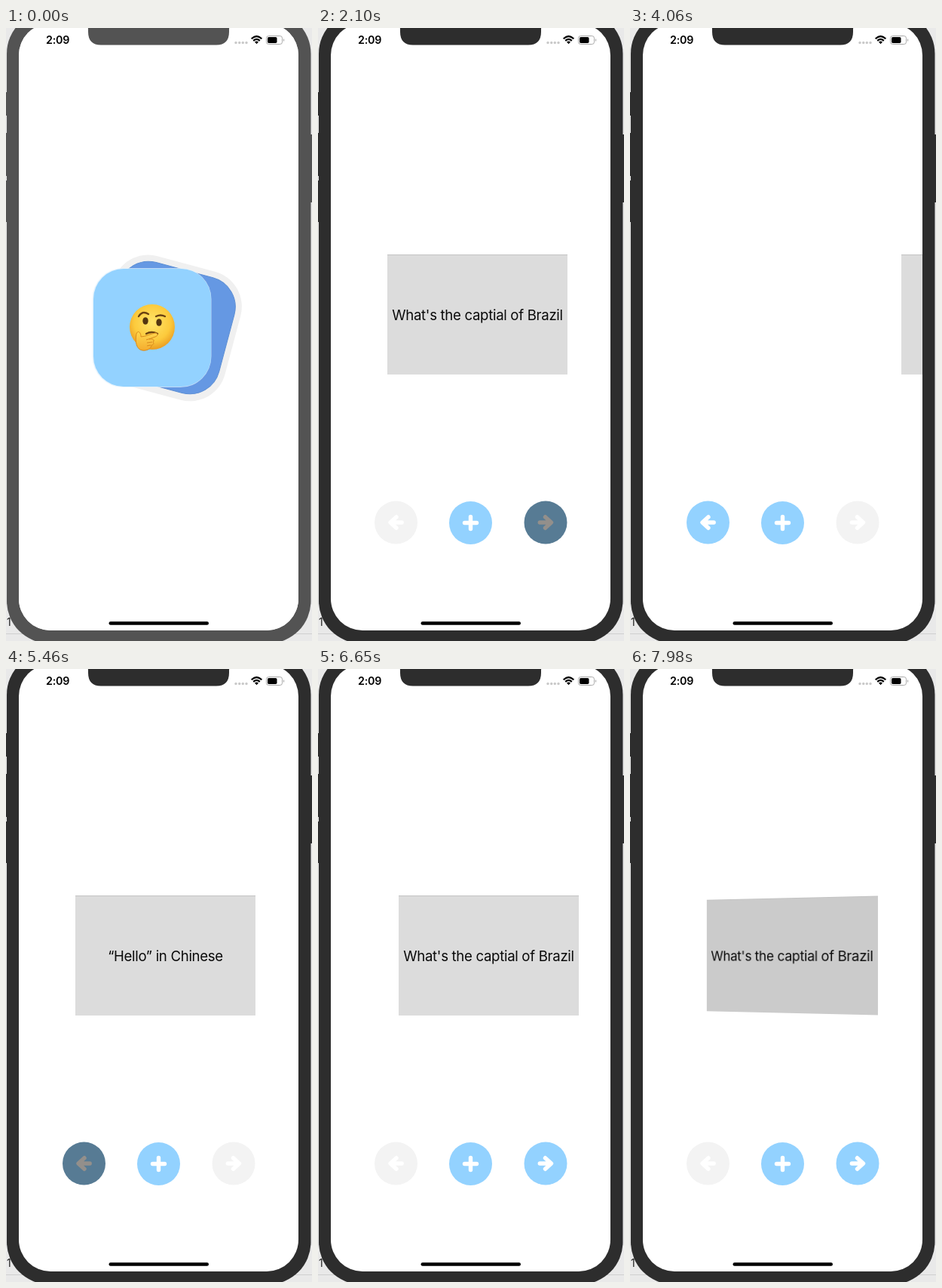
An HTML page for the animation above (8000 ms loop, 406x812 px).

```html
<!DOCTYPE html>
<html lang="en">
<head>
<meta charset="utf-8">
<title>Flash cards</title>
<style>
  html, body { margin: 0; width: 100%; height: 100%; overflow: hidden; }
  body { position: relative; background: #e9e9e9; font-family: Inter, "Open Sans", sans-serif; }
  body > *, #screen > * { position: absolute; }
  svg { left: 0; top: 0; display: block; }
  #screen {
    left: 17px; top: -6px; width: 371px; height: 804px;
    border-radius: 42px; background: #fff; overflow: hidden;
  }
  /* children of the screen use stage coordinates */
  #app, #splash { position: absolute; left: -17px; top: 6px; width: 406px; height: 812px; }
  #app > *, #splash > * { position: absolute; }
  #splash { background: #fff; }
  #card {
    left: 92px; top: 300px; width: 239px; height: 159px; box-sizing: border-box;
    border-top: 1.5px solid #c3c3c3; background: #dcdcdc; color: #0a0a0a;
    font-size: 18.6px; letter-spacing: -0.31px; line-height: 159px;
    text-align: center; white-space: nowrap;
  }
  .time { font-weight: 600; font-size: 14.3px; letter-spacing: -0.2px; }
  .icon { fill: none; stroke-width: 5.4; stroke-linejoin: round; stroke-linecap: round; }
</style>
</head>
<body>
<svg width="406" height="812" viewBox="0 0 406 812">
  <path d="M0 802.5H406" stroke="#cfcfcf"/>
  <text x="1" y="792" font-size="14" fill="#222">1</text>
  <g id="bezel">
    <rect x="1" y="-22" width="403.5" height="837" rx="56"/>
    <path d="M0 85h2v31h-2zM0 139h2v57h-2zM0 202h2v55h-2zM404 141h2v90h-2z"/>
  </g>
</svg>

<div id="screen">
  <div id="app">
    <svg width="406" height="812" viewBox="0 0 406 812">
      <g id="prev" transform="translate(103.5 655)">
        <circle r="28.5"/>
        <path class="icon" d="M.5-7.3L-7.5 0L.5 7.3M-6 0H7.7"/>
      </g>
      <g id="add" transform="translate(202.5 655.5)">
        <circle r="28.5"/>
        <path class="icon" d="M-8 0H8M0-8V8"/>
      </g>
      <g id="next" transform="translate(302 655)">
        <circle r="28.5"/>
        <path class="icon" d="M-.5-7.3L7.5 0L-.5 7.3M6 0H-7.7"/>
      </g>
    </svg>
    <div id="card"></div>
  </div>
  <div id="splash">
    <svg width="406" height="812" viewBox="0 0 406 812">
      <defs>
        <radialGradient id="skin" cx=".5" cy=".4" r=".62">
          <stop offset="0" stop-color="#ffe56a"/>
          <stop offset=".65" stop-color="#fcca3c"/>
          <stop offset="1" stop-color="#e8971f"/>
        </radialGradient>
        <linearGradient id="hand" x1="0" y1="0" x2="0" y2="1">
          <stop offset="0" stop-color="#ffd84f"/>
          <stop offset="1" stop-color="#f4ac2e"/>
        </linearGradient>
      </defs>
      <g transform="rotate(15 216.5 397)">
        <rect x="129" y="309.500" width="175" height="176" rx="48" fill="#f0f0f0"/>
        <rect x="137.500" y="318" width="158" height="158" rx="40" fill="#6598e3" stroke="#5d8fd4"/>
      </g>
      <rect x="114.500" y="318" width="158" height="158" rx="41" fill="#dff1fc" opacity=".75"/>
      <rect x="116" y="319" width="156" height="156" rx="40" fill="#93d2ff"/>
      <circle cx="194" cy="396" r="30" fill="url(#skin)"/>
      <g fill="none" stroke="#6b4212" stroke-width="2.300" stroke-linecap="round">
        <path d="M176 382Q181 374 189 379M199 382Q205 379 211 382M186 405Q193 401 201 405"/>
      </g>
      <g fill="#523510">
        <ellipse cx="185" cy="388" rx="3.700" ry="4.800"/>
        <ellipse cx="203" cy="390" rx="3.700" ry="4.800"/>
      </g>
      <path d="M173 405C175 400 179 403 179 409C185 409 192 405 198 404C202 404 202 408 198 409L190 412C195 411 198 414 195 416C197 418 195 420 193 420C193 425 186 428 181 427C173 426 171 416 173 405Z"
        fill="url(#hand)" stroke="#d98a1c" stroke-width="1"/>
      <path d="M186 413L191 411.500M187 417L194 416M187 421L192 420" stroke="#d98a1c" fill="none"/>
    </svg>
  </div>
</div>

<svg width="406" height="812" viewBox="0 0 406 812">
  <path id="notch" d="M103-6H302Q296-5 296 2V5Q296 22.500 279 22.500H126Q109 22.500 109 5V2Q109-5 103-6Z"/>
  <text class="time" x="53" y="21">2:09</text>
  <g fill="#c9c9c9">
    <circle cx="305" cy="19.500" r="1.700"/><circle cx="309.700" cy="19.500" r="1.700"/>
    <circle cx="314.300" cy="19.500" r="1.700"/><circle cx="319" cy="19.500" r="1.700"/>
  </g>
  <g fill="none" stroke="#000" stroke-width="2.200">
    <path d="M325.700 14.200Q332.500 7.800 339.300 14.200M328.200 16.900Q332.500 12.800 336.800 16.900"/>
  </g>
  <path d="M330 18.500Q332.500 16.300 335 18.500L332.500 21.200Z"/>
  <rect x="345.500" y="10.500" width="21" height="11" rx="3" fill="none" stroke="#a8a8a8"/>
  <rect x="347" y="12" width="12.500" height="8" rx="1.700"/>
  <path d="M368 14Q370.500 16 368 18Z" fill="#a8a8a8"/>
  <rect x="136.500" y="786.300" width="132.500" height="4.400" rx="2.200"/>
</svg>

<script>
const LOOP = 8000, TICK = 70, WIDTH = 371, EXIT = 150, ENTER = 500;
const cards = ["What's the captial of Brazil", "“Hello” in Spanish", "“Hello” in Chinese"];
// press time, release time, direction
const taps = [
  [2100, 2194.5, 1],
  [3710, 3733, 1],
  [5460, 5475, -1],
  [6580, 6633, -1]
];
const looks = {
  on: ["#93d2ff", "#fff"],
  off: ["#f3f3f3", "#fff"],
  down: ["#577b94", "#938f8b"]
};

const $ = id => document.getElementById(id);
const clamp = v => Math.min(1, Math.max(0, v));
const ease = t => t < .5 ? Math.pow(2 * t, 1.7) / 2 : 1 - Math.pow(2 - 2 * t, 1.7) / 2;

function paint(id, look) {
  const [fill, ink] = looks[look];
  const [disc, icon] = $(id).children;
  disc.setAttribute("fill", fill);
  icon.setAttribute("stroke", ink);
}

function slide(t, dir) {
  if (t < EXIT) return -dir * WIDTH * ease(t / EXIT);
  return dir * WIDTH * (1 - ease(clamp((t - EXIT) / ENTER)));
}

function draw(t) {
  let index = 0, x = 0, pressed = 0;
  for (const [press, release, dir] of taps) {
    if (t < press) break;
    if (t < release) { pressed = dir; break; }
    index += dir;
    x = slide(t - release, dir);
  }
  paint("prev", pressed < 0 ? "down" : index > 0 ? "on" : "off");
  paint("next", pressed > 0 ? "down" : index < cards.length - 1 ? "on" : "off");
  paint("add", "on");

  const flip = clamp((t - 7890) / 90);
  const grey = Math.round(220 - 17 * flip);
  const card = $("card");
  card.textContent = cards[index];
  card.style.background = `rgb(${grey},${grey},${grey})`;
  card.style.transform = flip
    ? `perspective(500px) rotateY(${-8.6 * flip}deg) scale(${1 - .04 * flip})`
    : `translateX(${Math.round(x)}px)`;

  $("splash").style.opacity = 1 - clamp(t / 770);
  const shell = t < 2100 ? "#535353" : "#2d2d2d";
  $("bezel").setAttribute("fill", shell);
  $("notch").setAttribute("fill", shell);
}

const start = performance.now();
function frame() {
  const t = (performance.now() - start) % LOOP;
  draw(Math.floor(t / TICK) * TICK);
  requestAnimationFrame(frame);
}
draw(0);
requestAnimationFrame(frame);
</script>
</body>
</html>
```
